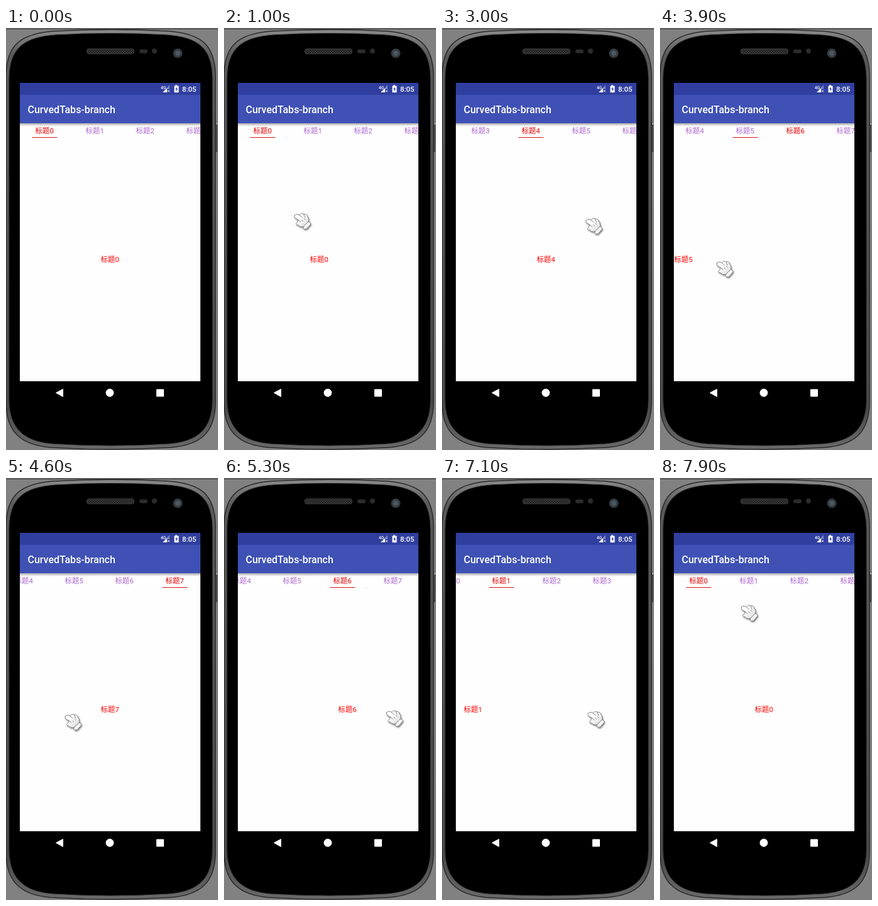
These frames come from a looping animation (337x669 px, 8 s). An HTML page:

```html
<!DOCTYPE html>
<html lang="zh-CN">
<head>
<meta charset="utf-8">
<title>Tabs</title>
<style>
  html, body { margin: 0; width: 100%; height: 100%; overflow: hidden; background: #818181; }
  svg { display: block; width: 337px; height: 669px; }
  text { font-family: Roboto, "Noto Sans CJK SC", "Noto Sans CJK JP", "Noto Sans CJK", sans-serif; }
  .label { font-size: 11.4px; text-anchor: middle; }
  .bar { fill: #fff; font-weight: 500; }
</style>
</head>
<body>
<svg viewBox="0 0 337 669">
  <defs>
    <clipPath id="screen"><rect x="22" y="151" width="287" height="409"/></clipPath>
    <linearGradient id="rim" x1="0" x2="0" y1="0" y2="1">
      <stop offset="0" stop-color="#8c8c8c"/><stop offset=".06" stop-color="#5a5a5a"/>
      <stop offset=".9" stop-color="#4a4a4a"/><stop offset="1" stop-color="#6a6a6a"/>
    </linearGradient>
    <linearGradient id="shade" x1="0" x2="0" y1="0" y2="1">
      <stop offset="0" stop-color="#000" stop-opacity=".32"/>
      <stop offset="1" stop-color="#000" stop-opacity="0"/>
    </linearGradient>
    <linearGradient id="glove" x1="0" x2="1" y1="0" y2="1">
      <stop offset=".35" stop-color="#fff"/><stop offset="1" stop-color="#d6d6d6"/>
    </linearGradient>
    <pattern id="mesh" width="4" height="4" patternUnits="userSpaceOnUse">
      <rect width="4" height="4" fill="#1c1c1c"/>
      <circle cx="1" cy="1" r=".9" fill="#484848"/><circle cx="3" cy="3" r=".9" fill="#484848"/>
    </pattern>
    <filter id="drop" x="-30%" y="-30%" width="170%" height="170%">
      <feDropShadow dx="1" dy="1.5" stdDeviation=".9" flood-color="#000" flood-opacity=".55"/>
    </filter>
    <path id="body" d="M0 75C1 26 24 9 76 5Q167 0 258 5C310 9 332 26 333 75V595C332 641 310 661 262 665Q167 671 71 665C24 661 1 641 0 595Z"/>
  </defs>

  <rect width="337" height="669" fill="#818181"/>
  <rect y="1" width="337" height="1" fill="#333"/>
  <rect x="331" y="149" width="5" height="48" rx="1.500" fill="#4a4a4a"/>
  <rect x="334" y="150" width="2" height="3" fill="#aaa"/>
  <use href="#body" fill="url(#rim)" stroke="#2a2a2a" stroke-width="1.500"/>
  <use href="#body" fill="#000" stroke="#242424" transform="translate(5 6) scale(.97 .982)"/>

  <rect x="128.500" y="33" width="75" height="8" rx="3" fill="url(#mesh)" stroke="#3c3c3c"/>
  <rect x="212" y="34" width="13" height="6" rx="3" fill="#2b2b2b"/>
  <circle cx="236" cy="36.500" r="4" fill="#2b2b2b"/>
  <circle cx="273" cy="40" r="7.500" fill="#343b41"/>
  <circle cx="273" cy="40" r="4" fill="#4c5861"/>

  <rect x="22" y="87" width="287" height="19" fill="#303f9f"/>
  <rect x="22" y="106" width="287" height="45" fill="#3f51b5"/>
  <rect x="22" y="151" width="287" height="409" fill="#fefefe"/>
  <rect x="22" y="151" width="287" height="5" fill="url(#shade)"/>
  <text class="bar" x="34.500" y="135" font-size="16">CurvedTabs-branch</text>
  <text class="bar" x="280" y="101" font-size="11.500">8:05</text>
  <text class="bar" x="246" y="96.500" font-size="6.500">4G</text>
  <path d="M249 102L260 91V97H256V102Z" fill="#fff"/>
  <path d="M260 91V97H256V95Z" fill="#7681c0"/>
  <path d="M257 98.500l3 3m0-3l-3 3" stroke="#fff"/>
  <path d="M269 90.500h3v1.200h2.500v10.500h-7V91.700h1.500Z" fill="#fff"/>
  <path d="M271.500 93.300l-2.400 4h1.600v3l2.400-4h-1.600Z" fill="#303f9f"/>

  <g clip-path="url(#screen)">
    <g id="tabs"></g>
    <rect id="line" y="173" width="40" height="1" fill="#d81818"/>
    <g id="pages"></g>
  </g>

  <g fill="#fff" stroke="#fff" stroke-linejoin="round">
    <path d="M79.500 578.300L90.500 572.500V584.500Z"/>
    <circle cx="165" cy="578.300" r="6"/>
    <rect x="239.500" y="573" width="11" height="11"/>
  </g>

  <g id="hand" filter="url(#drop)" fill="url(#glove)" stroke="#777" stroke-width=".9" stroke-linejoin="round" stroke-linecap="round">
    <path d="M-12.500 -9C-11 -12 -7 -11 -4.500 -9.500C-3 -12.500 0 -13 2 -11C5 -12 7.500 -10 8 -7C10 -5 10.500 -1.500 9.500 1.500L2 8.500C-2 9.500 -5 8.500 -7 6C-10.500 6 -11.500 3.500 -8.500 2L-6.500 -2L-11.500 -5Q-13.500 -7 -12.500 -9Z"/>
    <path d="M9.500 1Q13.500 1.500 13 5L6.500 12.500Q2.500 13.500 1 11L2 8.500Z"/>
    <path fill="none" d="M-4.500 -9.500L-.5 -6M2 -11L4 -6M-6.500 -2L-3 1M-1 -2L1 0M2.500 -4.500L4.500 -2.500"/>
  </g>
</svg>
<script>
const LOOP = 8000, STEP = 100, TABS = 8, TAB_W = 80, PAGE_W = 287, MAX_SCROLL = 353;
const $ = id => document.getElementById(id);
const clamp = v => Math.min(1, Math.max(0, v));
const mix = (a, b, k) => a + (b - a) * k;
const inOut = k => (1 - Math.cos(Math.PI * k)) / 2;
const out = k => Math.sin(Math.PI / 2 * k);

// Evenly spaced page changes; drag gives both ends of a swipe, taps have none.
const runs = [
  { first: 1, count: 2, dir: 1, start: 950, gap: 450, time: 350, drag: [[226, 300], [97, 308]] },
  { first: 3, count: 2, dir: 1, start: 2120, gap: 300, time: 250 },
  { first: 5, count: 3, dir: 1, start: 3220, gap: 480, time: 430, drag: [[265, 380], [103, 382]] },
  { first: 6, count: 7, dir: -1, start: 4800, gap: 415, time: 400, drag: [[109, 390], [271, 381]] }
];
const moves = runs.flatMap(r => Array.from({ length: r.count }, (_, i) => ({
  page: r.first + i * r.dir, start: r.start + i * r.gap, time: r.time, drag: r.drag
})));

// Where the hand goes between swipes
const stops = [
  { t: 100, at: [304, 171] }, { t: 250, at: [250, 247] }, { t: 600, at: [206, 217] },
  { t: 1800, at: [246.5, 221] }, { t: 2000, at: [235, 180] }, { t: 2700, at: [235, 180] },
  { t: 3000, at: [241.5, 314] }, { t: 7800, at: [142, 214] }
];
const swipes = moves.filter(m => m.drag).flatMap(({ start, drag: [from, to] }) => [
  { t: start - 60, at: from }, { t: start + 80, at: to }, { t: start + 200, at: to }
]);
const path = [...stops, ...swipes].sort((a, b) => a.t - b.t);

function makeLabels(parent, y, color) {
  return Array.from({ length: TABS }, (_, i) => {
    const el = document.createElementNS("http://www.w3.org/2000/svg", "text");
    el.setAttribute("class", "label");
    el.setAttribute("y", y);
    el.setAttribute("fill", color);
    el.textContent = "标题" + i;
    return parent.appendChild(el);
  });
}
const tabs = makeLabels($("tabs"), 166.8, "#aa66cc");
const pages = makeLabels($("pages"), 370.8, "#ff0000");

const scrollFor = page => Math.min(MAX_SCROLL, Math.max(0, page - 1) * TAB_W);

function stateAt(t) {
  let pos = 0, scroll = 0, selected = 0, lined = 0;
  for (const { page, start, time } of moves) {
    const pick = start + time * .4;
    pos = mix(pos, page, inOut(clamp((t - start) / time)));
    scroll = mix(scroll, scrollFor(page), out(clamp((t - pick) / 240)));
    if (t >= pick) selected = page;
    if (t >= pick + 60) lined = page;
  }
  return { pos, scroll, selected, lined };
}

function handAt(t) {
  const next = path.findIndex(k => k.t > t);
  if (next < 1) return path[next ? path.length - 1 : 0].at;
  const a = path[next - 1], b = path[next];
  const k = (t - a.t) / (b.t - a.t);
  return a.at.map((v, i) => mix(v, b.at[i], k));
}

function draw(t) {
  const { pos, scroll, selected, lined } = stateAt(t);
  const tabX = i => 61.2 + i * TAB_W - Math.round(scroll);
  tabs.forEach((el, i) => {
    el.setAttribute("x", tabX(i));
    el.setAttribute("fill", i === selected ? "#e60000" : "#aa66cc");
  });
  pages.forEach((el, i) => el.setAttribute("x", 165.2 + Math.round((i - pos) * PAGE_W)));
  $("line").setAttribute("x", tabX(lined) - 19.7);
  $("hand").setAttribute("transform", `translate(${handAt(t)})`);
  $("hand").style.display = t < 100 ? "none" : "";
}

const begin = performance.now();
function tick() {
  const t = (performance.now() - begin) % LOOP;
  draw(Math.floor(t / STEP) * STEP);
  requestAnimationFrame(tick);
}
tick();
</script>
</body>
</html>
```
